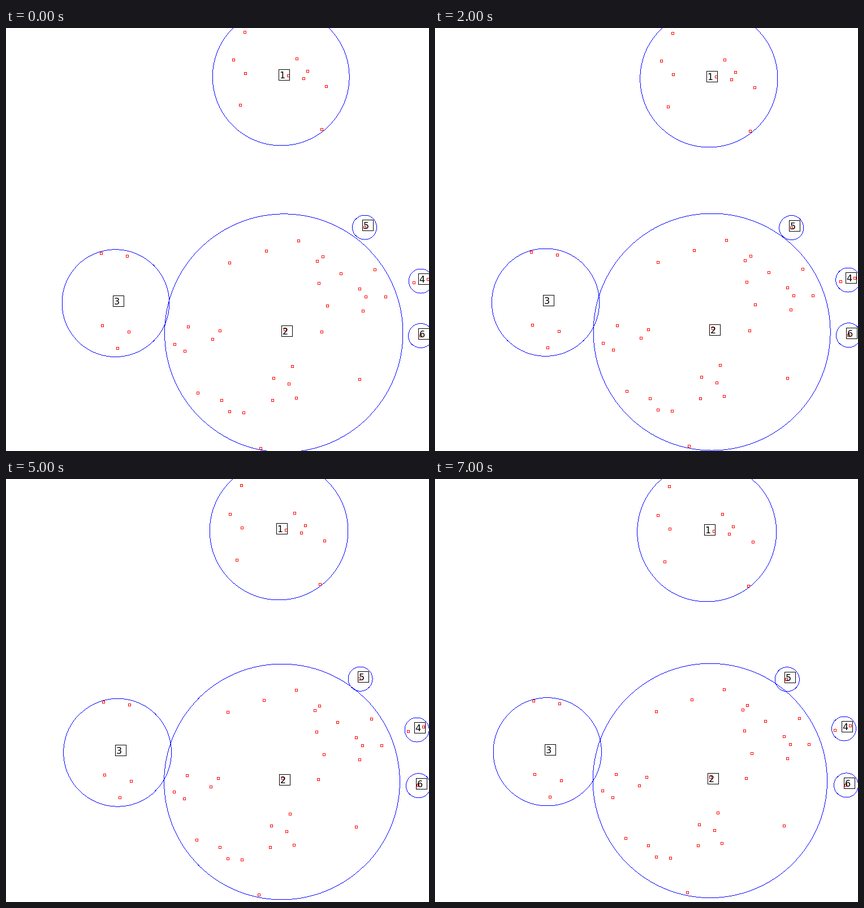
An HTML page with a canvas for the animation above (8000 ms loop, 748 by 748 pixels).

```html
<!DOCTYPE html>
<html lang="en">
<head>
<meta charset="utf-8">
<title>Moving clusters</title>
<style>
  html, body { margin: 0; width: 100%; height: 100%; overflow: hidden; background: #fff; }
  canvas { display: block; }
</style>
</head>
<body>
<canvas id="stage" width="748" height="748"></canvas>
<script>
const ctx = document.getElementById('stage').getContext('2d');
const SIZE = 748, STEP = 1000, STEPS = 8;
const MIN_RADIUS = 21.5, MARGIN = 3.2;

// Members are placed for the middle of the loop. Over one loop they move by
// drift and by spread times their distance from the cluster's centre.
const clusters = [
  { drift: [-6.4, 8.1], spread: 0.02, members: [
    [418, 10], [398, 60], [511, 58], [419, 84], [496, 88],
    [530, 80], [523, 93], [564, 107], [410, 141], [556, 184]] },
  { drift: [-5.7, -7.1], spread: -0.02, members: [
    [514, 374], [457, 392], [393, 413], [547, 410], [556, 402], [588, 431], [648, 425],
    [550, 448], [621, 458], [632, 472], [666, 472], [564, 488], [627, 497], [554, 533],
    [490, 530], [503, 594], [470, 615], [497, 625], [468, 653], [510, 649], [621, 617],
    [321, 525], [376, 531], [363, 546], [297, 555], [315, 567], [338, 640], [379, 653],
    [393, 673], [418, 675], [448, 737]] },
  { drift: [5.6, -5], spread: 0.01, members: [
    [171, 395], [217, 400], [173, 524], [220, 535], [200, 564]] },
  { drift: [-12.5, -7], spread: 0.1, members: [[714, 447], [740, 440]] },
  { drift: [-13, 2], spread: 0, members: [[627, 353]] },
  { drift: [-7, -3], spread: 0, members: [[729, 542]] }
];

const mean = values => values.reduce((a, b) => a + b) / values.length;
const centroid = points => [0, 1].map(axis => mean(points.map(p => p[axis])));

function membersAt({ drift, spread, members }, step) {
  const progress = step / (STEPS - 1) - 0.5;
  const centre = centroid(members);
  return members.map(point => point.map((v, axis) =>
    v + (drift[axis] + spread * (v - centre[axis])) * progress));
}

// The circle is centred on the mean and reaches just past the farthest member.
function fitCircle(points) {
  const [cx, cy] = centroid(points);
  const reach = Math.max(...points.map(([x, y]) => Math.hypot(x - cx, y - cy)));
  return [cx, cy, Math.max(MIN_RADIUS, reach + MARGIN)];
}

function dot(x, y) {
  ctx.fillRect(Math.round(x), Math.round(y), 1, 1);
}

// One-pixel circle without antialiasing.
function drawCircle(cx, cy, r) {
  ctx.fillStyle = '#00f';
  const half = Math.ceil(r * Math.SQRT1_2);
  for (let i = -half; i <= half; i++) {
    const j = Math.sqrt(r * r - i * i);
    for (const s of [-j, j]) {
      dot(cx + i, cy + s);
      dot(cx + s, cy + i);
    }
  }
}

function drawBox(left, top, size, colour) {
  ctx.strokeStyle = colour;
  ctx.strokeRect(left + 0.5, top + 0.5, size - 1, size - 1);
}

function drawLabel(text, cx, cy) {
  const left = Math.round(cx - 4), top = Math.round(cy - 13);
  drawBox(left, top, 20, '#000');
  ctx.fillStyle = '#000';
  ctx.fillText(text, left + 2, top + 16);
}

function render(now) {
  const step = Math.floor(now / STEP) % STEPS;
  const fitStep = step - step % 2; // circles are refitted on every second step
  ctx.fillStyle = '#fff';
  ctx.fillRect(0, 0, SIZE, SIZE);
  ctx.lineWidth = 1;
  ctx.font = '16px "DejaVu Sans", sans-serif';

  clusters.forEach((cluster, i) => {
    const [cx, cy, r] = fitCircle(membersAt(cluster, fitStep));
    drawCircle(cx, cy, r);
    for (const [x, y] of membersAt(cluster, step)) {
      drawBox(Math.round(x) - 2, Math.round(y) - 2, 5, '#f00');
    }
    drawLabel(String(i + 1), cx, cy);
  });
  requestAnimationFrame(render);
}
render(0);
</script>
</body>
</html>
```
